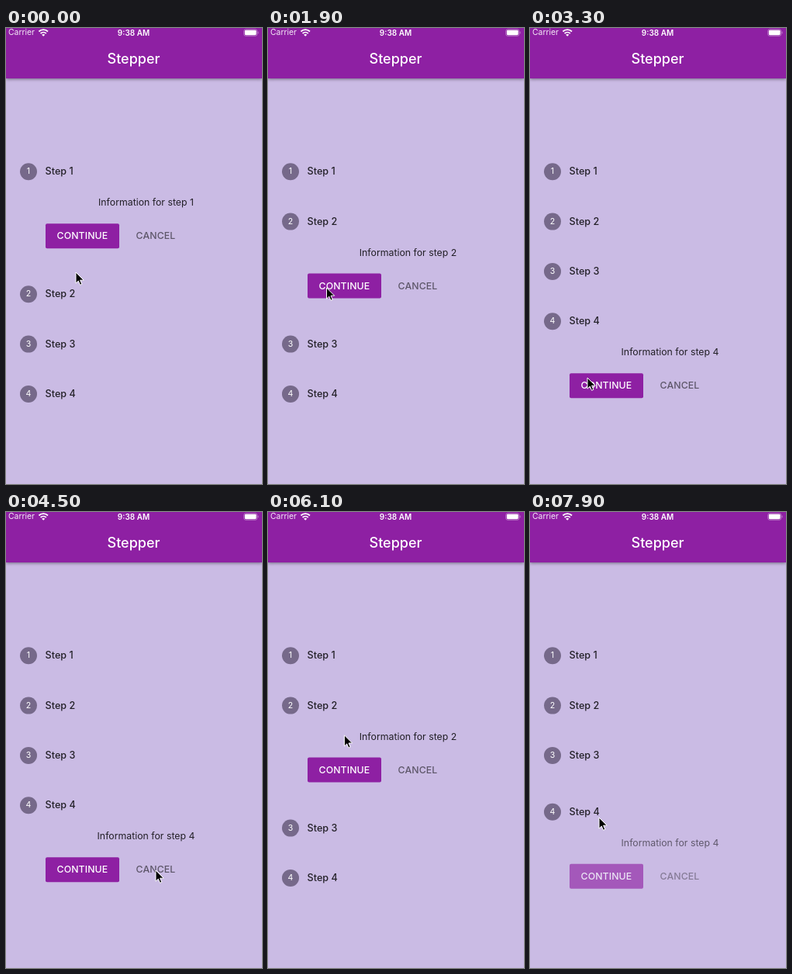
An HTML page for the animation above (8 s loop, 330 px wide and 588 px high).

```html
<!DOCTYPE html>
<html lang="en">
<head>
<meta charset="utf-8">
<title>Stepper</title>
<style>
  :root { --purple: #8e20a3; }
  html, body { margin: 0; width: 100%; height: 100%; overflow: hidden; }
  body {
    position: relative;
    background: #cabbe4;
    font-family: Inter, Roboto, "Liberation Sans", sans-serif;
    color: rgba(0, 0, 0, .83);
  }
  .bar {
    position: absolute; inset: 0 0 auto; height: 65px;
    background: var(--purple); color: #fff;
    box-shadow: 0 1px 4px rgba(0, 0, 0, .45);
  }
  .bar span { position: absolute; white-space: nowrap; line-height: 20px; }
  .carrier { left: 3px; top: -4px; font-size: 10.4px; opacity: .9; }
  .clock { left: 0; width: 329px; top: -4px; text-align: center; font-size: 10px; font-weight: 600; }
  .title { left: 0; width: 329px; top: 30px; text-align: center; font-size: 18px; font-weight: 500; }
  .bar svg { position: absolute; left: 0; top: 0; }

  .step { position: absolute; left: 0; top: 0; width: 330px; }
  .dot {
    position: absolute; left: 18px; top: -11px; width: 22px; height: 22px;
    border-radius: 50%; background: #76698a; color: #fff;
    font-size: 10.6px; line-height: 22px; text-align: center;
  }
  .name { position: absolute; left: 50.6px; top: -10px; font-size: 12.6px; line-height: 20px; font-weight: 500; white-space: nowrap; }
  .clip { position: absolute; left: 0; top: 28px; width: 330px; overflow: hidden; }
  .info { position: absolute; left: 31px; width: 299px; top: 2px; font-size: 12.3px; line-height: 20px; text-align: center; }
  .button {
    position: absolute; top: 39px; height: 32px; line-height: 32px;
    font-size: 12.3px; font-weight: 500; letter-spacing: .1px; text-align: center;
  }
  .go { left: 50.5px; width: 95.8px; border-radius: 2px; background: var(--purple); color: #fff; }
  .back { left: 153px; width: 80px; color: rgba(0, 0, 0, .54); }
  #cursor { position: absolute; left: -2px; top: -2px; }
</style>
</head>
<body>
<div class="bar">
  <span class="carrier">Carrier</span>
  <span class="clock">9:38 AM</span>
  <span class="title">Stepper</span>
  <svg width="330" height="14" fill="none" stroke="#fff" stroke-width="1.8">
    <path d="M42.4 4.5a8.2 8.2 0 0 1 11.6 0M44.6 7a5.2 5.2 0 0 1 7.2 0"/>
    <path d="M48.2 10.8l-2-2.1a3 3 0 0 1 4 0z" fill="#fff" stroke="none"/>
    <rect x="306.7" y="1.7" width="17" height="8.6" rx="2.4" stroke-width=".9" opacity=".4"/>
    <rect x="307.8" y="2.8" width="14.8" height="6.4" rx="1.4" fill="#fff" stroke="none"/>
    <path d="M325 4.6v2.8" stroke-width="1" opacity=".4"/>
  </svg>
</div>
<div id="steps"></div>
<svg id="cursor" width="16" height="22">
  <path d="M2 2v14.2l3.3-3.1 2.2 5.2 2.3-1-2.2-5.1h4.6z" fill="#000" stroke="#fff" stroke-width="1" stroke-linejoin="round"/>
</svg>
<script>
const LOOP = 8000, FADE = 200;
const TOP = 185.3, GAP = 64.3, OPEN = 93.7;

// [time, step that opens]
const changes = [[-FADE, 0], [1000, 1], [2100, 2], [2705, 3], [4610, 0], [5650, 1], [6950, 2], [7772, 3]];

// [time, x, y] of the pointer tip
const path = [
  [0, 90, 315], [700, 80, 274], [1050, 80, 274], [1800, 75.5, 335],
  [2150, 75.5, 335], [2550, 74, 396], [2800, 74, 396], [3250, 74, 451],
  [3650, 74, 451], [4450, 193, 462], [4700, 193, 462], [5300, 94.5, 272.7],
  [5750, 94.5, 272.7], [6600, 105, 313.5], [6700, 105, 313.5], [6950, 103, 321],
  [7200, 103, 321], [7700, 89, 394], [LOOP, 89, 394]
];

const clamp = v => Math.min(1, Math.max(0, v));
const smooth = v => v * v * (3 - 2 * v);

// cubic-bezier(.4, 0, .2, 1)
function ease(x) {
  let lo = 0, hi = 1;
  for (let i = 0; i < 20; i++) {
    const s = (lo + hi) / 2, r = 1 - s;
    if (1.2 * r * r * s + .6 * r * s * s + s * s * s < x) lo = s; else hi = s;
  }
  return smooth(lo);
}
const fade = v => ease(clamp((v - .4) / .6));

const holder = document.getElementById("steps");
const cursor = document.getElementById("cursor");
const steps = [1, 2, 3, 4].map(n => {
  const row = document.createElement("div");
  row.className = "step";
  row.innerHTML = `<div class="dot">${n}</div><div class="name">Step ${n}</div>
    <div class="clip"><div class="info">Information for step ${n}</div>
    <div class="button go">CONTINUE</div><div class="button back">CANCEL</div></div>`;
  holder.append(row);
  return { row, clip: row.querySelector(".clip") };
});

function drawSteps(t) {
  const k = changes.findLastIndex(c => c[0] <= t);
  const [at, active] = changes[k];
  const previous = k ? changes[k - 1][1] : -1;
  const p = clamp((t - at) / FADE);
  let y = TOP;
  steps.forEach(({ row, clip }, i) => {
    const size = i === active ? ease(p) : i === previous ? 1 - ease(p) : 0;
    const alpha = i === active ? fade(p) : i === previous ? fade(1 - p) : 0;
    row.style.transform = `translateY(${y}px)`;
    clip.style.height = size * OPEN + "px";
    clip.style.opacity = alpha;
    y += GAP + size * OPEN;
  });
}

function drawCursor(t) {
  const k = path.findIndex(p => p[0] > t);
  const [t0, x0, y0] = path[k - 1], [t1, x1, y1] = path[k];
  const s = smooth((t - t0) / (t1 - t0));
  cursor.style.transform = `translate(${x0 + (x1 - x0) * s}px, ${y0 + (y1 - y0) * s}px)`;
}

const start = performance.now();
function tick() {
  const t = (performance.now() - start) % LOOP;
  drawSteps(t);
  drawCursor(t);
  requestAnimationFrame(tick);
}
tick();
</script>
</body>
</html>
```
